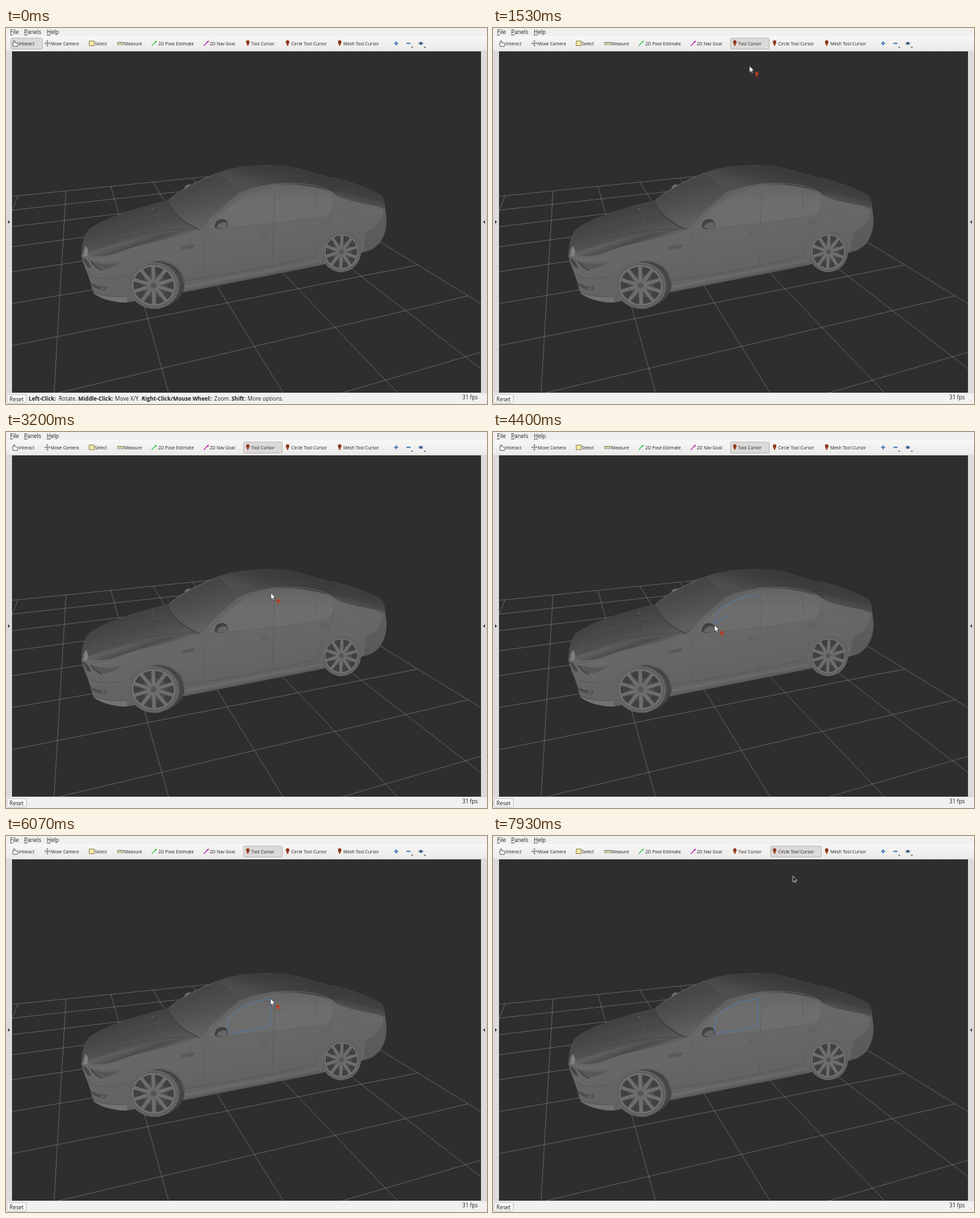
An HTML page with a canvas that plays this animation: 720x563 px, repeating every 8000 ms.

```html
<!DOCTYPE html>
<html lang="en">
<head>
<meta charset="utf-8">
<title>3D view</title>
<style>
html, body { margin: 0; width: 100%; height: 100%; overflow: hidden; background: #f1f0ef; }
canvas { display: block; width: 720px; height: 563px; }
</style>
</head>
<body>
<canvas id="stage" width="720" height="563"></canvas>
<script>
const W = 720, H = 563, LOOP = 8000;
const FONT = '"Open Sans", "Noto Sans", sans-serif';
const ctx = document.getElementById('stage').getContext('2d');
const scene = document.createElement('canvas');
scene.width = W;
scene.height = H;
const sc = scene.getContext('2d');

// Pointer path: time, x, y
const KEYS = [
  [560, 396, -14], [700, 388, 20], [800, 381, 43.5], [930, 380, 40], [1080, 383, 23],
  [1400, 383, 23], [1600, 384, 80], [1800, 381, 149], [2000, 370, 225], [2200, 365, 258],
  [2400, 372, 253], [2600, 383, 247], [2900, 393, 242], [3200, 396.5, 241], [3370, 395, 243.5],
  [3530, 377, 247], [3800, 357, 255], [4050, 341, 265], [4250, 333, 276], [4400, 331.5, 289],
  [4550, 335, 294], [4750, 350, 293], [5000, 373, 290], [5200, 390, 286], [5400, 395, 282],
  [5600, 396, 272], [5850, 396, 257], [6070, 396, 243.5], [6250, 397, 242], [6500, 404, 205],
  [7000, 430, 120], [7350, 450, 25], [7860, 452, 24], [7920, 449, 58], [8000, 449, 58]
];
const DRAW_FROM = 3370, DRAW_TO = 6070;
const TOOL_ON = 1300, TOOL_OFF = 6500, CIRCLE_ON = 7900;

function pointerAt(t) {
  let i = 0;
  while (i < KEYS.length - 2 && t >= KEYS[i + 1][0]) i++;
  const a = KEYS[i], b = KEYS[i + 1];
  const p = KEYS[Math.max(0, i - 1)], n = KEYS[Math.min(KEYS.length - 1, i + 2)];
  const d = b[0] - a[0], s = Math.min(1, Math.max(0, (t - a[0]) / d));
  return [1, 2].map(c => {
    const m0 = (b[c] - p[c]) / (b[0] - p[0]) * d;
    const m1 = (n[c] - a[c]) / (n[0] - a[0]) * d;
    const e = s * s * (3 - 2 * s);
    return a[c] + (b[c] - a[c]) * e + m0 * s * (1 - s) ** 2 - m1 * s * s * (1 - s);
  });
}

function text(c, str, x, y, size, weight = 400) {
  c.font = `${weight} ${size}px ${FONT}`;
  c.fillStyle = '#202020';
  c.fillText(str, x, y);
}

function ramp(c, x0, y0, x1, y1, ...colors) {
  const g = c.createLinearGradient(x0, y0, x1, y1);
  colors.forEach((col, i) => g.addColorStop(i / (colors.length - 1), col));
  return g;
}

function shape(c, d, fill) {
  c.fillStyle = fill;
  c.fill(new Path2D(d));
}

function line(c, d, color, width = 0.8) {
  c.strokeStyle = color;
  c.lineWidth = width;
  c.stroke(new Path2D(d));
}

function oval(c, x, y, rx, ry, fill, rot = 0) {
  c.beginPath();
  c.ellipse(x, y, rx, ry, rot, 0, 7);
  c.fillStyle = fill;
  c.fill();
}

function box(c, x, y, w, h, fill, stroke) {
  c.beginPath();
  c.roundRect(x + 0.5, y + 0.5, w - 1, h - 1, 2);
  c.fillStyle = fill;
  c.fill();
  c.strokeStyle = stroke;
  c.lineWidth = 0.8;
  c.stroke();
}

function pin(c, x, y, color, k = 1) {
  c.save();
  c.translate(x, y);
  c.scale(k, k);
  shape(c, 'M0 5.2C-1.2 2.4-2.8 0-2.8-1.8A2.8 2.8 0 0 1 2.8-1.8C2.8 0 1.2 2.4 0 5.2Z', color);
  oval(c, 0, -1.9, 1, 1, '#6e2415');
  c.restore();
}

// Grid lines are given by their direction from two vanishing points
function drawGrid() {
  const far = [2300, 20], near = [102, 40];
  const across = k => -9.87 + 0.807 * k, down = k => -0.398 + 0.3386 * k;
  const cross = (u, v) => {
    const y = (near[0] - far[0] + u * far[1] - v * near[1]) / (u - v);
    return [near[0] + v * (y - near[1]), y];
  };
  const seg = (a, b) => line(sc, `M${a}L${b}`, 'rgba(160,160,164,.55)', 0.8);
  for (let k = 0; k < 10; k++) seg(cross(across(k), down(-1)), cross(across(k), down(6)));
  for (let k = -1; k <= 6; k++) seg(cross(across(0), down(k)), cross(across(9), down(k)));
}

function drawWheel(x, y, rx, ry, rot) {
  sc.save();
  sc.translate(x, y);
  sc.rotate(rot);
  sc.scale(rx, ry);
  oval(sc, 0, 0, 1, 1, '#646464');
  oval(sc, 0, 0, 0.87, 0.87, '#727272');
  oval(sc, 0, 0, 0.8, 0.8, '#414141');
  oval(sc, 0.05, 0, 0.5, 0.5, '#4c4c4c');
  sc.strokeStyle = '#6e6e6e';
  for (let i = 0; i < 10; i++) {
    const a = i * Math.PI / 5 + 0.15;
    sc.lineWidth = 0.15;
    sc.beginPath();
    sc.moveTo(0.15 * Math.cos(a), 0.15 * Math.sin(a));
    sc.lineTo(0.83 * Math.cos(a), 0.83 * Math.sin(a));
    sc.stroke();
  }
  oval(sc, 0, 0, 0.23, 0.23, '#6c6c6c');
  oval(sc, 0, 0, 0.12, 0.12, '#555');
  sc.strokeStyle = '#525252';
  sc.lineWidth = 0.02;
  sc.beginPath();
  sc.arc(0, 0, 0.89, 0, 7);
  sc.stroke();
  sc.restore();
}

function drawCar() {
  oval(sc, 273, 239, 6, 4.5, '#707070', -0.4);
  const body = 'M113 342C114 326 116 310 124 302C140 288 190 270 243 258C262 240 300 221 335 211C365 205 405 203 432 209C455 214 470 221 487 224C515 228 545 242 561 250C568 258 567 268 569 280C571 298 567 310 560 321C552 330 545 334 533 336L472 355L269 395L181 411C160 411 140 405 131 397L127 384C124 370 116 356 113 342Z';
  shape(sc, body, ramp(sc, 320, 230, 350, 385, '#5c5c5c', '#686868', '#666', '#616161'));
  sc.save();
  sc.clip(new Path2D(body));

  // rear quarter and boot
  shape(sc, 'M476 220C515 226 548 240 563 250C569 260 567 268 566 271C545 262 515 262 490 248Z', ramp(sc, 520, 230, 512, 264, '#3b3b3b', '#404040', '#5c5c5c'));
  shape(sc, 'M567 256L572 300L554 332L534 338L540 305C556 300 565 290 567 256Z', 'rgba(70,70,70,.3)');
  line(sc, 'M494 252C516 260 545 264 566 264', 'rgba(60,60,60,.4)');

  // roof, windscreen, bonnet
  shape(sc, 'M316 217C345 203 405 200 432 208C456 214 472 221 489 226C500 234 500 244 493 247C440 229 388 229 348 247C336 238 326 228 316 217Z', ramp(sc, 405, 204, 395, 242, '#3a3a3a', '#404040', '#4e4e4e'));
  shape(sc, 'M243 259C262 242 290 229 318 217C330 226 342 238 350 246C330 262 305 285 289 302C270 293 252 280 243 266Z', ramp(sc, 285, 235, 300, 292, '#464646', '#515151', '#606060'));
  shape(sc, 'M112 340C114 318 118 306 124 301C140 287 190 270 243 257C246 277 272 294 289 302C240 304 178 318 118 338Z', ramp(sc, 195, 268, 210, 322, '#404040', '#494949', '#5a5a5a'));
  shape(sc, 'M118 338C178 318 240 304 289 302C275 312 205 321 171 335C150 343 132 344 118 338Z', ramp(sc, 200, 313, 207, 332, '#5e5e5e', '#4b4b4b', '#656565'));
  line(sc, 'M128 331C165 313 220 302 282 301', 'rgba(60,60,60,.5)', 1);
  line(sc, 'M243 261C249 279 270 294 290 302', '#3a3a3a', 1.1);
  line(sc, 'M130 322C150 302 190 286 243 276', 'rgba(105,105,105,.2)', 1.5);
  line(sc, 'M290 302C306 284 328 262 350 246', '#5a5a5a', 1.2);
  oval(sc, 219, 271, 1.4, 0.7, '#707070');
  oval(sc, 227, 290, 1.4, 0.7, '#707070');

  // side glass
  const glass = 'M301 301C324 274 350 248 395 237C432 231 475 238 490 250C493 264 488 278 480 281C425 290 360 298 301 301Z';
  shape(sc, glass, ramp(sc, 390, 236, 390, 298, '#656565', '#6e6e6e', '#6c6c6c'));
  line(sc, glass, 'rgba(80,80,80,.35)', 0.8);
  line(sc, 'M304 299C328 270 354 245 398 234C440 229 474 236 490 247', '#6c6c6c', 0.8);
  line(sc, 'M402 237C403 255 403 275 400 291', '#616161', 1.2);
  line(sc, 'M404.5 237C405 255 405 275 402.5 290', '#747474', 0.6);
  line(sc, 'M462 237Q465 255 464 272', '#5e5e5e', 0.9);

  // doors, creases, sill
  line(sc, 'M301 303C295 320 294 348 298 375', 'rgba(75,75,75,.35)');
  line(sc, 'M400 292C399 315 401 335 398 357', 'rgba(75,75,75,.35)');
  line(sc, 'M490 268C487 295 472 310 464 340', 'rgba(75,75,75,.35)');
  line(sc, 'M262 327C350 310 470 295 566 275', 'rgba(120,120,120,.22)', 2);
  line(sc, 'M269 378C340 368 410 355 466 340', 'rgba(75,75,75,.5)', 1);
  shape(sc, 'M268 386L472 347L472 356L269 396Z', ramp(sc, 360, 366, 363, 381, '#737373', '#606060', '#484848'));
  shape(sc, 'M263 327L283 323L281 329L262 332Z', '#595959');
  for (const [x, y] of [[388, 308], [478, 290]]) {
    oval(sc, x, y, 9, 2.6, '#5d5d5d', -0.13);
    line(sc, `M${x - 9} ${y + 1}L${x + 9} ${y - 1.5}`, '#737373', 1.1);
  }

  // nose
  shape(sc, 'M116 342C116 333 118 327 120 327C123 331 124 337 121 342Z', '#808080');
  shape(sc, 'M114 344C121 345 126 352 127 360L121 357Z', '#474747');
  shape(sc, 'M127 349C138 352 150 356 172 350C165 357 154 361 142 362C135 359 130 355 127 349Z', '#575757');
  line(sc, 'M127 349C132 356 138 361 144 363', '#3f3f3f', 1.3);
  line(sc, 'M129 349C145 346 160 345 176 347', '#727272');
  line(sc, 'M121 367C136 378 160 377 181 371', 'rgba(60,60,60,.4)');
  shape(sc, 'M127 381C134 386 143 388 151 387L149 393C140 393 132 389 128 385Z', '#4c4c4c');
  oval(sc, 145, 390, 3.5, 2.5, '#5f5f5f');
  shape(sc, 'M130 396C145 403 162 404 181 402L181 412C160 411 140 405 130 396Z', '#727272');
  line(sc, 'M130 395Q152 404 181 402', '#555');
  sc.restore();

  // mirror
  shape(sc, 'M312 298C313 287 321 284 328 287C333 290 333 296 331 299C325 302 317 302 312 298Z', '#414141');
  shape(sc, 'M315 298C319 291 326 289 331 292L331 299C325 302 319 301 315 298Z', '#646464');

  // front wheel
  oval(sc, 224, 382, 41, 33, '#5c5c5c');
  oval(sc, 228, 383, 39, 35, '#4c4c4c');
  sc.setLineDash([1.5, 1.8]);
  for (const dx of [2, 5]) {
    sc.beginPath();
    sc.ellipse(222 + dx, 384, 39, 34, 0, -1.6, 1.1);
    sc.strokeStyle = '#2c2c2c';
    sc.lineWidth = 1.5;
    sc.stroke();
  }
  sc.setLineDash([]);
  drawWheel(221, 385.5, 38, 35, 0.15);
  line(sc, 'M181 400C181 370 195 350 225 349C250 350 264 363 266 382', '#666', 1);

  // rear wheel
  shape(sc, 'M471 354C472 322 485 304 507 304C523 304 534 316 534 336L500 350Z', '#616161');
  drawWheel(502, 335, 29.5, 30.5, 0.2);
  line(sc, 'M471 354C473 321 485 304 507 303C523 303 534 316 534 335', '#6e6e6e', 1);
}

function drawIcons() {
  shape(sc, 'M10 22L11.5 22L11.5 19.3L13 19L13.3 22L18 23L17.2 27.5L10.5 27.5Z', '#fff');
  line(sc, 'M10 22L11.5 22L11.5 19.3L13 19L13.3 22L18 23L17.2 27.5L10.5 27.5Z', '#444', 0.8);
  line(sc, 'M62 18.8V27.2M58 23H66M60.7 20L62 18.7L63.3 20M60.7 26L62 27.3L63.3 26M59.3 21.7L58 23L59.3 24.3M64.7 21.7L66 23L64.7 24.3', '#555');
  sc.fillStyle = '#f3e8a3';
  sc.fillRect(124.5, 19.5, 7.5, 7);
  line(sc, 'M124.5 19.5H132V26.5H124.5Z', '#77714a');
  sc.fillStyle = '#e8e1b0';
  sc.fillRect(167, 21.5, 9, 3.5);
  line(sc, 'M167 21.5H176V25H167ZM169 21.5V23M171.5 21.5V23M174 21.5V23', '#555', 0.6);
  for (const [x, col] of [[218, '#31c94b'], [296, '#b520b5']]) {
    line(sc, `M${x} 26.8L${x + 6} 20.5`, col, 1.2);
    shape(sc, `M${x + 8} 18.8L${x + 6.5} 22.2L${x + 4.5} 20.2Z`, col);
  }
  for (const x of [362, 421.5, 499.5]) pin(sc, x, 22.6, '#9c4126', 0.95);
  line(sc, 'M584 20V26M581 23H587', '#5585bf', 2.1);
  line(sc, 'M599.5 23H605.5', '#5585bf', 2.1);
  oval(sc, 621, 23, 4.3, 2.5, '#b5c5d8');
  oval(sc, 621, 23, 2, 2, '#2d4e7b');
  for (const x of [608, 627]) shape(sc, `M${x - 1.5} 28H${x + 1.5}L${x} 30Z`, '#444');
}

function buildScene() {
  sc.fillStyle = '#f1f0ef';
  sc.fillRect(0, 0, W, H);
  sc.fillStyle = ramp(sc, 0, 12, 0, 34, '#f7f7f6', '#ebeae9');
  sc.fillRect(0, 12, W, 22);
  sc.fillStyle = '#dcdbda';
  sc.fillRect(0, 34, W, 513);
  sc.fillStyle = '#2f2d30';
  sc.fillRect(9, 35, 702, 511);
  sc.save();
  sc.beginPath();
  sc.rect(9, 35, 702, 511);
  sc.clip();
  drawGrid();
  drawCar();
  sc.restore();
  shape(sc, 'M3 288L6 290.5L3 293Z', '#333');
  shape(sc, 'M717 288L714 290.5L717 293Z', '#333');
  [['File', 6, 4], ['Panels', 27, 5], ['Help', 61, 6]].forEach(([s, x, w]) => {
    text(sc, s, x, 9.2, 8.4);
    sc.fillRect(x, 10.3, w, 0.7);
  });
  box(sc, 1, 548.5, 30, 13.5, '#fafafa', '#b4b0ac');
  text(sc, 'Reset', 5, 558.6, 8.4);
  text(sc, '31 fps', 683, 556, 8.2);
}

const BUTTONS = { interact: [7, 48], tool: [355, 59], circle: [415, 77] };
const LABELS = [['Interact', 19], ['Move Camera', 67], ['Select', 133], ['Measure', 177],
  ['2D Pose Estimate', 228], ['2D Nav Goal', 305], ['Tool Cursor', 367],
  ['Circle Tool Cursor', 427], ['Mesh Tool Cursor', 505]];
const HINT = [['Left-Click:', 34, 1], ['Rotate.', 79, 0], ['Middle-Click:', 108, 1],
  ['Move X/Y.', 163, 0], ['Right-Click/Mouse Wheel:', 203, 1], [': Zoom.', 307.5, 0],
  ['Shift', 337.5, 1], [': More options.', 357.5, 0]];

// Toolbar artwork sits above the pressed button, so it has its own layer
const icons = document.createElement('canvas');
icons.width = W;
icons.height = 36;

function buildIcons() {
  sc.clearRect(0, 0, W, H);
  drawIcons();
  LABELS.forEach(([s, x]) => text(sc, s, x, 25.6, 6.55));
  icons.getContext('2d').drawImage(scene, 0, 0);
  sc.clearRect(0, 0, W, H);
}

function drawTrace(t) {
  if (t < DRAW_FROM) return;
  const end = Math.min(t, DRAW_TO), start = pointerAt(DRAW_FROM);
  ctx.beginPath();
  ctx.moveTo(...start);
  for (let s = DRAW_FROM; s < end; s += 30) ctx.lineTo(...pointerAt(s));
  const tip = pointerAt(end);
  ctx.lineTo(...tip);
  ctx.strokeStyle = '#4c7cbc';
  ctx.lineWidth = 0.9;
  ctx.lineJoin = 'round';
  ctx.stroke();
  // visible part of the closing chord
  const k = t < DRAW_TO ? 0.33 : 1;
  ctx.beginPath();
  ctx.moveTo(...tip);
  ctx.lineTo(tip[0] + (start[0] - tip[0]) * k, tip[1] + (start[1] - tip[1]) * k);
  ctx.stroke();
}

function drawPointer(t, mode) {
  if (t < KEYS[0][0]) return;
  const [x, y] = pointerAt(t);
  const plain = y < 35 || mode === 'circle';
  const arrow = 'M0 0V11L2.5 8.8L4.2 12.3L6 11.5L4.4 8H7.8Z';
  ctx.save();
  ctx.translate(x, y);
  ctx.lineJoin = 'round';
  if (plain) {
    ctx.scale(0.8, 0.8);
    shape(ctx, arrow, '#1c1c1c');
    line(ctx, arrow, '#dedede', 1);
  } else {
    ctx.save();
    ctx.scale(0.88, 0.88);
    shape(ctx, arrow, '#fff');
    line(ctx, arrow, '#222', 0.7);
    ctx.restore();
    if (mode === 'tool') pin(ctx, 11, 12.8, '#c4431f', 0.85);
    else line(ctx, 'M11 8.5V16.5M7 12.5H15M9.8 9.8L11 8.4L12.2 9.8M9.8 15.2L11 16.6L12.2 15.2M8.4 11.3L7 12.5L8.4 13.7M13.6 11.3L15 12.5L13.6 13.7', '#eee', 0.9);
  }
  ctx.restore();
}

function render(t) {
  const mode = t >= CIRCLE_ON ? 'circle' : t >= TOOL_ON && t < TOOL_OFF ? 'tool' : 'interact';
  ctx.drawImage(scene, 0, 0);
  const [bx, bw] = BUTTONS[mode];
  box(ctx, bx, 14.5, bw, 17.5, '#dcdad9', '#b1aeab');
  ctx.drawImage(icons, 0, 0);
  if (mode === 'interact') HINT.forEach(([s, x, bold]) => text(ctx, s, x, 558, 8.2, bold ? 700 : 400));
  drawTrace(t);
  drawPointer(t, mode);
}

buildIcons();
buildScene();
const began = performance.now();
function tick() {
  render((performance.now() - began) % LOOP);
  requestAnimationFrame(tick);
}
tick();
</script>
</body>
</html>
```
